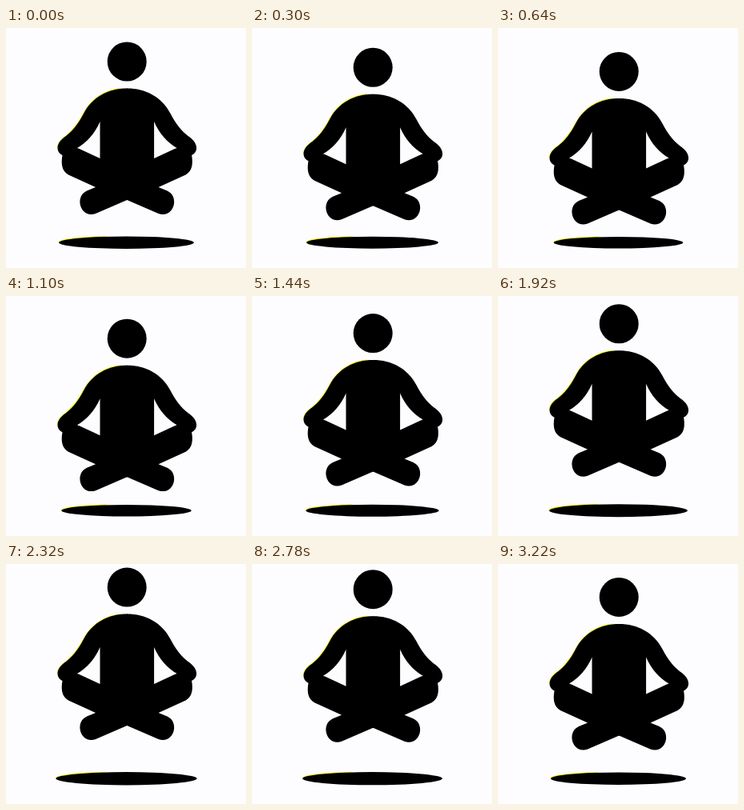
An HTML page for the animation above (3.24 s loop, 300 by 300 pixels).

```html
<!DOCTYPE html>
<html lang="en">
<head>
<meta charset="utf-8">
<title>Levitating meditation</title>
<style>
  html, body { margin: 0; width: 100%; height: 100%; overflow: hidden; background: #fdfcff; }
  svg { display: block; width: 100vw; height: 100vh; }
  .rim { fill: none; stroke: #f4f000; stroke-width: 1.5; }
</style>
</head>
<body>
<svg viewBox="0 0 300 300">
  <path id="shadowRim" class="rim"/>
  <ellipse id="shadow" cx="150.5" cy="268.2"/>
  <g id="figure">
    <path class="rim" d="M144 75.8C125 77 107 88 97 107C90 120 84 128 75 135C69 139 64.5 144 64.5 150"/>
    <circle cx="151.2" cy="42" r="24.5"/>
    <path id="half" fill-rule="evenodd" d="M152 75.5H151.3C128 75.5 108 86 97 107C90 120 84 128 75 135
      C69 139 64.5 144 64.5 150C64.5 154 67 157.5 70.5 159C68.5 170 70 179 78 183.5L112 199L101 203.5
      C94 207 92 213 92.5 219C93.5 229 102 235.5 112 232L151.3 215H152Z
      M117.5 117V163L96 153Q92 151 89 150C101 143 111 132 117.5 117Z"/>
    <use href="#half" transform="translate(302.6) scale(-1 1)"/>
  </g>
</svg>
<script>
  const LOOP = 3240, STEP = 20;
  const [figure, shadow, rim] = ['figure', 'shadow', 'shadowRim'].map(id => document.getElementById(id));

  function draw(now) {
    const t = Math.floor(now % LOOP / STEP) * STEP;
    const sink = Math.sin(2 * Math.PI * t / LOOP);
    const rx = 84.4 - 3.8 * sink, ry = 7.7 - 0.5 * sink;
    figure.setAttribute('transform', `translate(0 ${13.2 * sink})`);
    shadow.setAttribute('rx', rx);
    shadow.setAttribute('ry', ry);
    // Thin highlight on the upper left of the shadow
    rim.setAttribute('d', `M${150.5 - rx} 268.2a${rx} ${ry} 0 0 1 ${rx * 0.7} ${-ry * 0.954}`);
  }

  function tick() {
    draw(performance.now());
    requestAnimationFrame(tick);
  }
  tick();
</script>
</body>
</html>
```
